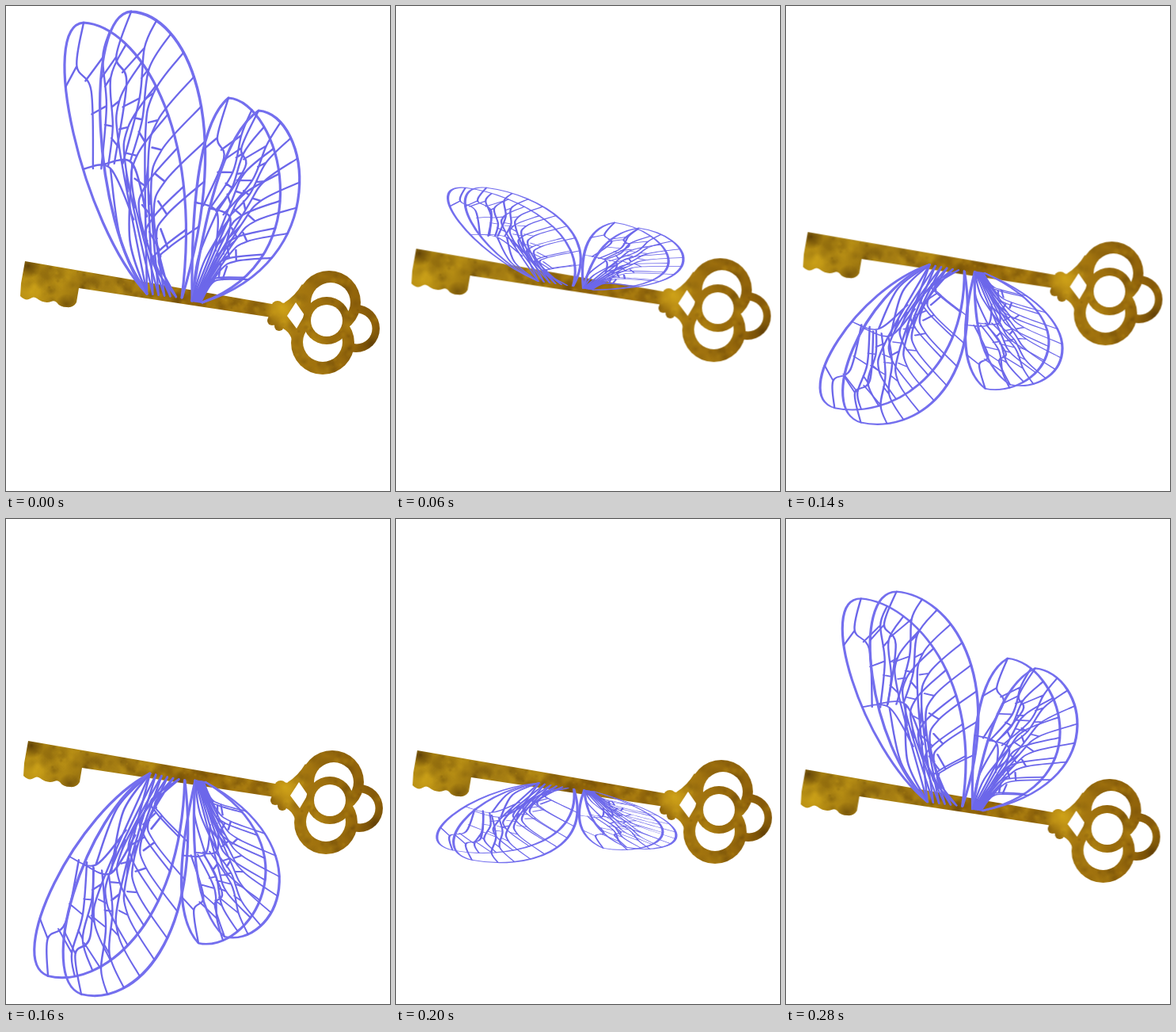
Animation of 485 by 612 pixels, one loop 300 ms. Source, as an HTML page with a canvas:

```html
<!DOCTYPE html>
<html lang="en">
<head>
<meta charset="utf-8">
<title>Winged key</title>
<style>
  html, body { margin: 0; width: 100%; height: 100%; overflow: hidden; background: #fff; }
  canvas { display: block; }
</style>
</head>
<body>
<canvas id="stage" width="485" height="612"></canvas>
<script>
const W = 485, H = 612, LOOP = 300, STEP = 20, RISE = 160;
const ctx = document.getElementById('stage').getContext('2d');

let seed = 11;
const random = () => (seed = seed * 16807 % 2147483647) / 2147483647;
const mix = (a, b, k) => [a[0] + (b[0] - a[0]) * k, a[1] + (b[1] - a[1]) * k];

// ---------- key ----------
function makeKey() {
  const layer = document.createElement('canvas');
  layer.width = W;
  layer.height = H;
  const c = layer.getContext('2d');
  const disc = (x, y, r) => { c.beginPath(); c.arc(x, y, r, 0, 7); c.fill(); };
  const shape = d => c.fill(new Path2D(d));
  const add = () => c.globalCompositeOperation = 'source-over';
  const cut = () => c.globalCompositeOperation = 'destination-out';

  // bow: right ring behind the upper and lower ones, middle ring in front
  disc(442, 407, 30);
  cut(); disc(443, 407, 19.5);
  add(); disc(408, 374, 40); disc(400, 425, 40);
  shape('M352 374Q365 366 374 351L394 375L386 425L364 437Q363 414 350 407Z');
  cut(); disc(410, 374, 25); disc(400, 424, 25);
  shape('M355 391L366 374L377 390L367 407Z');
  add(); disc(405, 397, 30);
  cut(); disc(405, 397, 20);

  // shaft with bit, then collar
  add();
  shape('M24 322L336 376V393L92 356L89 374Q85 381 77 380Q68 380 64 374Q61 371 57 373' +
        'Q48 376 39 369Q35 366 31 369Q25 373 18 366L19 350Z');
  shape('M332 377L356 374L354 408L331 400Z');
  disc(343, 380, 8); disc(336, 397, 6); disc(345, 404, 6);

  // mottled gold
  c.globalCompositeOperation = 'source-atop';
  const gold = c.createLinearGradient(18, 0, 473, 0);
  ['#ac8410', '#a47c12', '#946608', '#a87a10', '#8a5c08']
    .forEach((tone, i) => gold.addColorStop(i / 4, tone));
  c.fillStyle = gold;
  c.fillRect(0, 0, W, H);
  const blot = (x, y, r, rgb, a) => {
    const g = c.createRadialGradient(x, y, 0, x, y, r);
    g.addColorStop(0, `rgba(${rgb},${a})`);
    g.addColorStop(1, `rgba(${rgb},0)`);
    c.fillStyle = g;
    c.fillRect(x - r, y - r, 2 * r, 2 * r);
  };
  const dark = '74,46,4', light = '222,178,28';
  for (let i = 0; i < 800; i++) {
    const x = 15 + random() * 460, y = 320 + x * .16 + (random() - .4) * (x > 340 ? 170 : 70);
    blot(x, y, 2 + random() * 10, random() < .5 ? dark : light, .18);
  }
  blot(32, 360, 24, light, .7);
  blot(348, 380, 26, light, .7);
  blot(28, 328, 16, dark, .7);
  blot(76, 376, 13, dark, .5);
  blot(462, 425, 20, dark, .6);
  return layer;
}

// ---------- wings ----------
const bezier = (a, b, c, d) => t => {
  const ab = mix(a, b, t), bc = mix(b, c, t), cd = mix(c, d, t);
  return mix(mix(ab, bc, t), mix(bc, cd, t), t);
};

// Smooth curve through points.
function curve(path, points) {
  const at = i => points[Math.max(0, Math.min(points.length - 1, i))];
  path.moveTo(...points[0]);
  for (let i = 0; i < points.length - 1; i++) {
    const [a, b, c, d] = [at(i - 1), at(i), at(i + 1), at(i + 2)];
    path.bezierCurveTo(b[0] + (c[0] - a[0]) / 6, b[1] + (c[1] - a[1]) / 6,
                       c[0] - (d[0] - b[0]) / 6, c[1] - (d[1] - b[1]) / 6, ...c);
  }
}

// trail and lead are the wing's two edges as cubics from tip (0) to root (1).
function makeWing(trail, lead) {
  const edge = new Path2D(), net = new Path2D();
  for (const side of [trail, lead]) {
    edge.moveTo(...side[0]);
    edge.bezierCurveTo(...side[1], ...side[2], ...side[3]);
  }
  const left = bezier(...trail), right = bezier(...lead);
  const grid = (u, s) => mix(left(s), right(s), u);

  // forked tip vein, and the bar that closes the long cells at the root
  let last = [grid(0, 0), grid(.18, .3), grid(.3, .4), grid(.1, .61)];
  curve(net, last);
  curve(net, [grid(0, .36), grid(.18, .3)]);
  curve(net, [grid(0, .6), grid(.27, .63), grid(.34, .78)]);
  curve(net, [grid(.27, .63), grid(.1, .82), grid(0, 1)]);

  // veins from the leading edge to the bar or root, each tied to the one before
  const rows = 8;
  for (let i = 0; i < rows; i++) {
    const s = .16 + .1 * i, rest = 1 - s;
    const foot = i < 2 ? grid(.18 + .08 * i, .62) : grid((i - 2) / (rows - 2), 1);
    const vein = [right(s), grid(.57, s + .16 * rest), grid(.42, s + .36 * rest), foot];
    curve(net, vein);
    for (const k of [1, 2]) curve(net, [vein[k], mix(last[k], last[k + 1], k === 1 ? .6 : .3)]);
    last = vein;
  }
  return { edge, net };
}

const fore = makeWing([[98, 21], [40, 25], [95, 275], [178, 363]],
                      [[98, 21], [165, 25], [250, 150], [222, 368]]);
const hind = makeWing([[281, 116], [240, 150], [234, 270], [235, 372]],
                      [[281, 116], [345, 120], [402, 317], [248, 374]]);

// offset: tip shift at rest; swing: tip travel over the stroke; bow: sideways arc of the tip
const foreRoot = { wing: fore, root: [178, 363], span: 325 };
const hindRoot = { wing: hind, root: [248, 374], span: 260 };
const wings = [
  { ...foreRoot, offset: [0, 0], swing: [-49, 597], bow: 7 },
  { ...foreRoot, offset: [60, -14], swing: [-67, 634], bow: -22 },
  { ...hindRoot, offset: [0, 0], swing: [-42, 461], bow: 10 },
  { ...hindRoot, offset: [38, 16], swing: [-47, 437], bow: 4 }
];

// Shears the wing by its tip while the line along the shaft stays put.
function drawWing({ wing, root, span, offset, swing, bow }, p) {
  const nx = .157 / span, ny = -.988 / span;
  const dx = offset[0] + swing[0] * p + bow * Math.sin(Math.PI * p);
  const dy = offset[1] + swing[1] * p;
  const base = root[0] * nx + root[1] * ny;
  ctx.save();
  ctx.transform(1 + dx * nx, dy * nx, dx * ny, 1 + dy * ny, -dx * base, -dy * base);
  ctx.strokeStyle = '#746fee';
  ctx.lineWidth = 3.2;
  ctx.stroke(wing.edge);
  ctx.strokeStyle = '#6c67ea';
  ctx.lineWidth = 2.4;
  ctx.stroke(wing.net);
  ctx.restore();
}

ctx.lineCap = ctx.lineJoin = 'round';
const key = makeKey();

function draw(now) {
  const t = Math.floor(now % LOOP / STEP) * STEP;
  const p = t < RISE ? t / RISE : (LOOP - t) / (LOOP - RISE);
  ctx.fillStyle = '#fff';
  ctx.fillRect(0, 0, W, H);
  ctx.save();
  ctx.translate(4 * p, -42 * p);
  ctx.drawImage(key, 0, 0);
  wings.forEach(w => drawWing(w, p));
  ctx.restore();
}

const start = performance.now();
function tick() {
  draw(performance.now() - start);
  requestAnimationFrame(tick);
}
tick();
</script>
</body>
</html>
```
